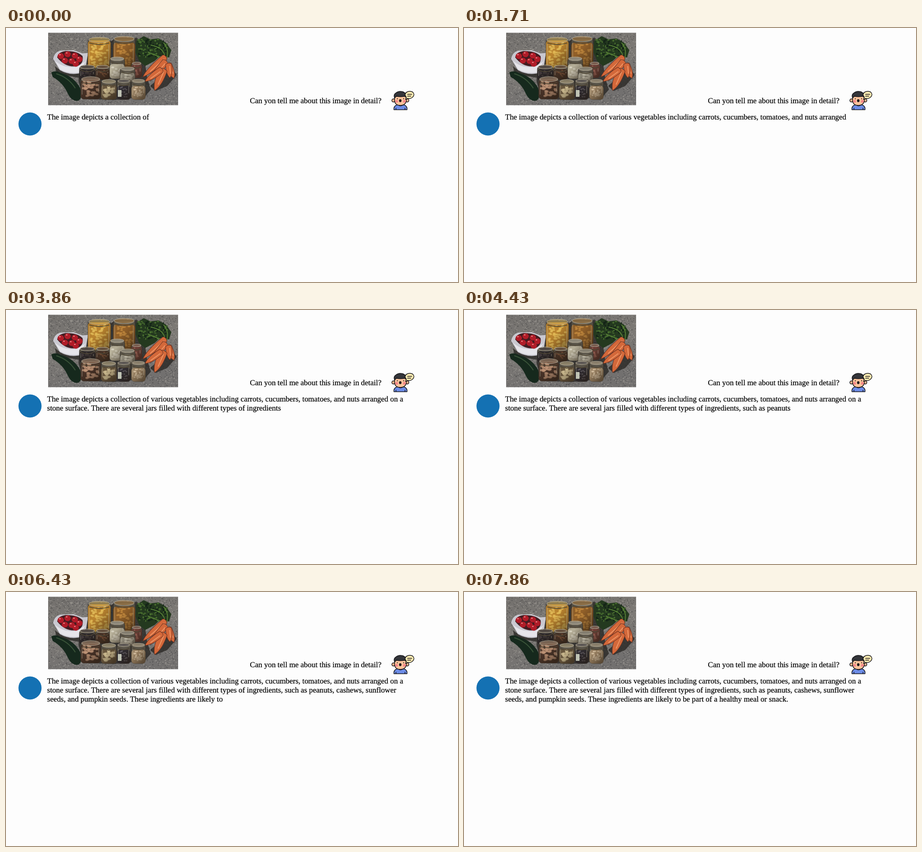
Write an HTML page that moves like this. It is 998 px wide and 561 px high and loops after 8 s.

```html
<!DOCTYPE html>
<html lang="en">
<head>
<meta charset="utf-8">
<title>Image chat</title>
<style>
  html, body { margin: 0; width: 100%; height: 100%; overflow: hidden; background: #fdfdfd; }
  svg { display: block; width: 998px; height: 561px; }
  text {
    font: 16.93px "Liberation Serif", "Times New Roman", serif;
    text-rendering: geometricPrecision;
    stroke: #000; stroke-width: .25;
  }
</style>
</head>
<body>
<svg viewBox="0 0 998 561">
  <defs>
    <clipPath id="frame"><rect x="93" y="10.5" width="287" height="160"/></clipPath>
    <linearGradient id="stone" x2=".3" y2="1">
      <stop offset="0" stop-color="#73706d"/>
      <stop offset=".5" stop-color="#7d7a76"/>
      <stop offset="1" stop-color="#72706f"/>
    </linearGradient>
    <linearGradient id="shade" x2=".7" y2="1">
      <stop offset="0" stop-color="#241a10" stop-opacity=".15"/>
      <stop offset=".45" stop-color="#241a10" stop-opacity=".05"/>
      <stop offset="1" stop-color="#241a10" stop-opacity=".55"/>
    </linearGradient>
  </defs>

  <g clip-path="url(#frame)">
    <rect x="93" y="10" width="287" height="161" fill="url(#stone)"/>
    <g id="grain"></g>
    <g fill="#24221f" opacity=".75">
      <path d="M162 84L182 60L240 24L290 22L306 70L312 112L320 136L306 152L240 159L172 156L160 118Z"/>
      <path d="M318 128L366 88L377 104L356 128L330 139Z"/>
      <path d="M108 84Q130 106 170 100L162 110L112 102Z"/>
    </g>

    <!-- cloth bag and tomatoes -->
    <path d="M104 68Q107 54 119 50L149 49L169 56L181 55L177 81L162 100Q140 105 119 93Z" fill="#c9c8d0"/>
    <path d="M113 65Q115 53 131 51Q157 50 169 62Q172 78 158 84Q132 89 113 65Z" fill="#431c21"/>
    <path d="M108 72Q125 89 157 86L175 74L162 98Q138 102 119 91Z" fill="#e6e5ea"/>
    <g id="tomatoes"></g>

    <!-- zucchini -->
    <path d="M100 98Q110 93 121 99Q150 107 164 133Q171 158 157 161Q144 161 136 144Q126 121 103 108Z" fill="#16291d"/>
    <path d="M111 101Q138 109 153 133" fill="none" stroke="#3a5439" stroke-width="2"/>

    <!-- carrots and their leaves -->
    <path d="M287 29L304 18L319 25L337 23L354 33L365 49L360 65L340 62L328 73L307 84L294 73L286 54Z" fill="#24391f"/>
    <g id="leaves"></g>
    <path d="M320 38Q349 43 351 65M313 53L349 68M348 33Q361 47 354 69" fill="none" stroke="#557d35" stroke-width="2"/>
    <g id="carrots"></g>
    <g id="jars"></g>
  </g>

  <circle cx="53" cy="212" r="25.5" fill="#1471b3"/>

  <!-- speaking boy -->
  <g stroke="#17171b" stroke-width="1.5" stroke-linejoin="round" stroke-linecap="round">
    <path d="M856.500 180.500V177Q858 170 866 169.500H876Q884 170 885.500 177V180.500Z" fill="#6d8de8"/>
    <path d="M861 180V177M881 180V177" fill="none"/>
    <path d="M865 169Q871 175 877 169Z" fill="#f3aa7e"/>
    <circle cx="855.500" cy="160" r="3.500" fill="#f9b78d"/>
    <circle cx="886" cy="160" r="3.500" fill="#f9b78d"/>
    <path d="M858 151H884V161Q882 171 871 171Q859 171 858 161Z" fill="#ffc39b"/>
    <path d="M858 155Q855 147 861 143.500Q866 139 875 140.500Q885 143 884.500 155L881 150.500Q870 153 862 150.500Z" fill="#34353a"/>
    <path d="M884 153Q878 146 885 141.500Q892 138 898 141.500Q904 147.500 897 153.500Q892 157 887 155.500L882 158Z" fill="#ffedb3"/>
    <path d="M886.500 146.500H896M886.500 150.500H894" fill="none" stroke-width="1.3"/>
    <path d="M864 156V156.500M878 156V156.500" fill="none" stroke-width="1.8"/>
    <ellipse cx="870.500" cy="160.500" rx="2" ry="2.500" fill="#241b1b"/>
  </g>
  <g fill="#f58488"><circle cx="862.500" cy="162" r="3"/><circle cx="879.500" cy="162" r="3"/></g>

  <text x="538.500" y="166.400">Can yon tell me about this image in detail?</text>
  <g id="answer"></g>
</svg>

<script>
const $ = id => document.getElementById(id);
let seed = 17;
const random = () => (seed = seed * 16807 % 2147483647) / 2147483647;
const between = (a, b) => a + (b - a) * random();
const repeat = (n, make) => Array.from({ length: n }, make).join('');
const ellipse = (x, y, rx, ry, style) =>
  `<ellipse cx="${x}" cy="${y}" rx="${rx}" ry="${ry}" ${style}/>`;

const specks = (n, color) =>
  `<path fill="${color}" opacity=".5" d="${repeat(n, () =>
    `M${between(93, 379)} ${between(10, 170)}h${between(1, 3)}v1.5h-2z`)}"/>`;
$('grain').innerHTML = specks(1100, '#353437') + specks(1100, '#bab5ad');

$('tomatoes').innerHTML = [[121, 62], [136, 58], [152, 61], [162, 69], [130, 72], [145, 73], [154, 79]]
  .map(([x, y]) => ellipse(x, y, 7, 6.5, 'fill="#b01c28"') + ellipse(x - 2, y - 3, 1.8, 1.2, 'fill="#ed8a8a"'))
  .join('');

$('leaves').innerHTML = repeat(110, () => ellipse(between(291, 356), between(25, 66),
  between(1, 3), between(1, 2.5), `fill="${random() < .55 ? '#142417' : '#466a2e'}"`));

// A carrot tapers from its crown (x, y) to its tip.
function carrot([x, y, tipX, tipY, width]) {
  const angle = Math.atan2(tipY - y, tipX - x) * 180 / Math.PI;
  const length = Math.hypot(tipX - x, tipY - y);
  return `<g transform="translate(${x} ${y}) rotate(${angle})">
    <path d="M0 ${-width / 2}Q${length * .7} ${-width * .65} ${length} 0Q${length * .7} ${width * .65} 0 ${width / 2}
      Q-5 0 0 ${-width / 2}Z" fill="#d3683a" stroke="#6b3020"/>
    <path d="M4 -2H${length * .7}" stroke="#ee9565" stroke-width="2"/></g>`;
}
$('carrots').innerHTML = [
  [358, 80, 371, 111, 14], [351, 64, 302, 108, 13], [352, 74, 318, 116, 14],
  [359, 80, 362, 110, 13], [348, 92, 328, 138, 17], [343, 92, 307, 118, 13]
].map(carrot).join('');

// The contents start at the given share of the jar's height; the glass above stays dark.
function jar([x, y, w, h, fill, bits, bitColor, size, level]) {
  const cx = x + w / 2, top = y + h * level, bottom = y + h;
  const contents = repeat(bits, () => ellipse(between(x + 6, x + w - 6), between(top + 3, bottom - 6),
    size, size * .7, `fill="${bitColor}" opacity=".8"`));
  const body = (from, style) =>
    `<rect x="${x}" y="${from}" width="${w}" height="${bottom - from}" rx="7" ${style}/>`;
  return body(y + 4, 'fill="#5d584d" stroke="#34302a"') + body(top, `fill="${fill}"`) + contents
    + body(y + 4, 'fill="url(#shade)"')
    + ellipse(cx, y + 6, w / 2 - 2, w * .12, `fill="${bitColor}" fill-opacity=".4" stroke="#aaa28e" stroke-width="1.2"`)
    + `<path d="M${x + 3} ${y + 13}Q${cx} ${y + 20} ${x + w - 3} ${y + 13}" fill="none" stroke="#4d4433" stroke-width="1.8"/>
    <path d="M${x + 3} ${y + 15}V${bottom - 10}M${x + w - 4} ${y + 17}V${bottom - 14}" stroke="#d7d3bd" opacity=".5"/>`;
}
$('jars').innerHTML = [
  [181, 20, 50, 75, '#c38a31', 65, '#efc65c', 3, .1],
  [237, 18, 48, 70, '#98642a', 55, '#cf9241', 2.8, .2],
  [277, 72, 23, 38, '#6f4038', 12, '#a5695a', 2, .2],
  [162, 80, 35, 36, '#2c282b', 12, '#504546', 2, .3],
  [198, 80, 31, 34, '#463226', 15, '#795138', 2, .3],
  [229, 62, 33, 50, '#bdb69f', 16, '#e2ddca', 3, .35],
  [252, 84, 33, 36, '#928d7e', 12, '#cdc8b6', 3, .4],
  [165, 107, 44, 50, '#4b352a', 40, '#c99b7d', 3.5, .15],
  [210, 112, 34, 46, '#6e5c42', 26, '#dac89b', 3.5, .3],
  [245, 111, 30, 47, '#302d33', 16, '#69656c', 2, .35],
  [277, 111, 31, 47, '#a08767', 30, '#dcc7a8', 2, .35]
].map(jar).join('') + '<rect x="247" y="137" width="8" height="15" fill="#c0c3b4"/>';

const lines = [
  'The image depicts a collection of various vegetables including carrots, cucumbers, tomatoes, and nuts arranged on a',
  'stone surface. There are several jars filled with different types of ingredients, such as peanuts, cashews, sunflower',
  'seeds, and pumpkin seeds. These ingredients are likely to be part of a healthy meal or snack.'
].map((line, i) => {
  const node = document.createElementNS('http://www.w3.org/2000/svg', 'text');
  node.setAttribute('x', 90.8);
  node.setAttribute('y', 202.2 + i * 20);
  $('answer').append(node);
  return { node, tokens: line.match(/ ?\w+|[.,]/g) };
});

const LOOP = 8000, STEP = 1000 / 7, FIRST_TOKENS = 6, TOKENS_PER_STEP = 1.025;

function render(now) {
  const step = Math.floor((now % LOOP + 5) / STEP);
  let shown = FIRST_TOKENS + Math.floor(step * TOKENS_PER_STEP);
  for (const { node, tokens } of lines) {
    node.textContent = tokens.slice(0, Math.max(0, shown)).join('');
    shown -= tokens.length;
  }
}

const start = performance.now();
function tick() {
  render(performance.now() - start);
  requestAnimationFrame(tick);
}
tick();
</script>
</body>
</html>
```
